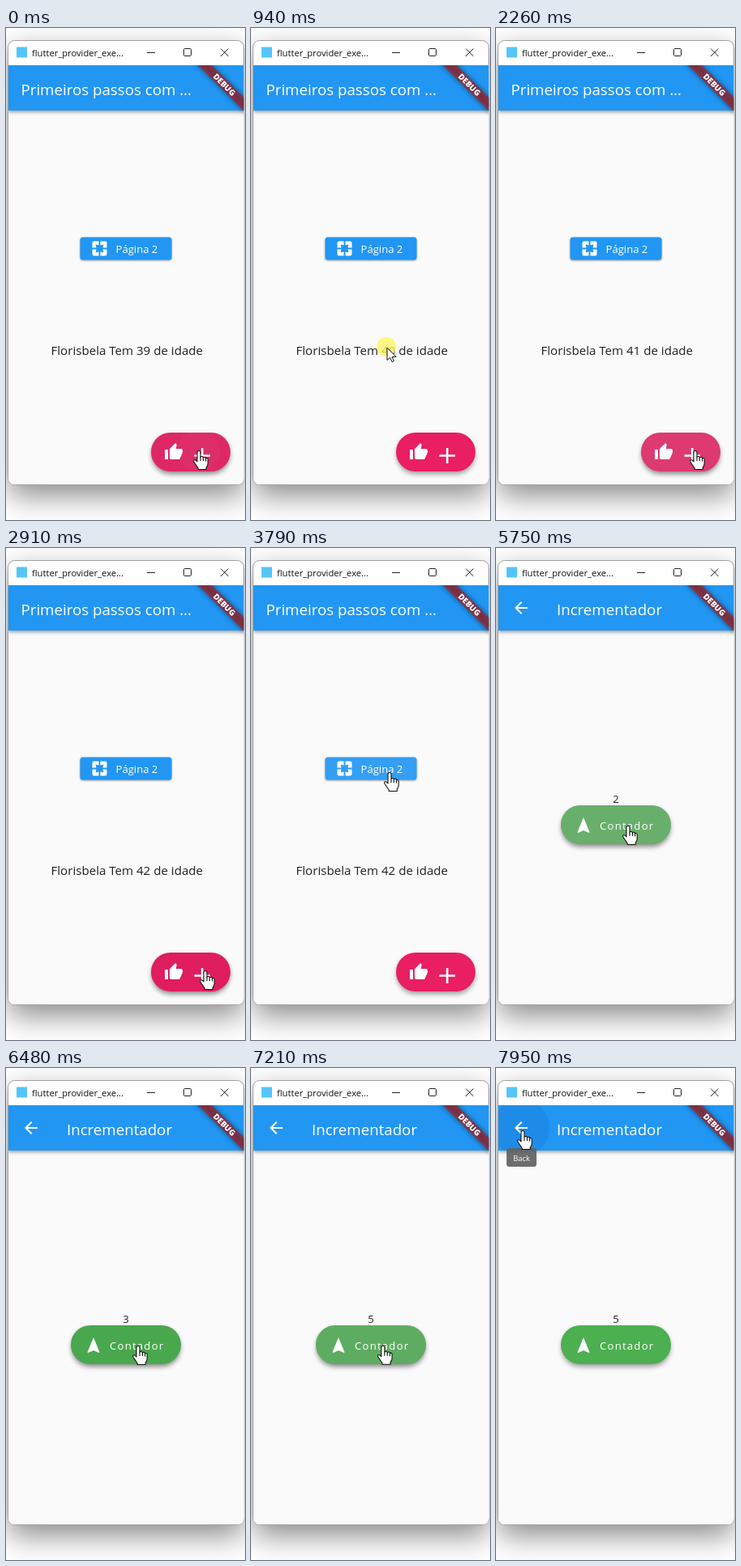
An HTML page that plays this animation: 295x608 px, repeating every 8000 ms.

```html
<!DOCTYPE html>
<html lang="pt">
<head>
<meta charset="utf-8">
<title>Provider demo</title>
<style>
html, body { margin: 0; width: 100%; height: 100%; overflow: hidden; background: #fff; }
svg { display: block; width: 295px; height: 608px; font-family: "Open Sans", "Noto Sans", sans-serif; }
.bar, .button { filter: drop-shadow(0 2px 2px rgba(0,0,0,.38)); }
.button { filter: drop-shadow(0 1.5px 1.2px rgba(0,0,0,.4)); }
.title { font-size: 18.7px; }
.label { font-size: 13.1px; }
.white { fill: #fff; }
.ink { fill: #202020; }
</style>
</head>
<body>
<svg viewBox="0 0 295 608">
  <defs>
    <filter id="blur" x="-40%" y="-20%" width="180%" height="140%"><feGaussianBlur stdDeviation="18"/></filter>
    <filter id="soft" x="-40%" y="-100%" width="180%" height="300%"><feGaussianBlur stdDeviation="3"/></filter>
    <clipPath id="client"><path d="M3 46H293.500V556.500a7.500 7.500 0 0 1 -7.500 7.500H10.500a7.500 7.500 0 0 1 -7.500 -7.500Z"/></clipPath>
    <clipPath id="fabClip"><rect x="179" y="500" width="98" height="48" rx="24"/></clipPath>
    <clipPath id="pillClip"><rect id="pillMask" height="48" rx="24"/></clipPath>
    <clipPath id="barClip"><rect x="3" y="46" width="290" height="56"/></clipPath>
  </defs>

  <rect width="295" height="608" fill="#fff"/>
  <rect x="3" y="29" width="290" height="549" rx="8" opacity=".46" filter="url(#blur)"/>
  <rect x="2.500" y="15.500" width="291" height="549" rx="8" fill="#fff" stroke="#a2a2a2"/>
  <rect x="13" y="23.500" width="13" height="13" fill="#54c5f8"/>
  <text x="32" y="34.500" font-size="11.2" fill="#111">flutter_provider_exe...</text>
  <path d="M174 30.500H184M265 25.500L274.500 35M274.500 25.500L265 35" stroke="#222" fill="none"/>
  <rect x="219.500" y="25.500" width="9" height="9" rx="1.200" fill="none" stroke="#222"/>

  <g clip-path="url(#client)">
    <rect x="3" y="46" width="291" height="519" fill="#fafafa"/>
    <g id="home">
      <rect x="3" y="46" width="291" height="519" fill="#fafafa"/>
      <rect class="bar" x="3" y="46" width="291" height="56" fill="#2196f3"/>
      <text class="title white" x="18.500" y="83">Primeiros passos com …</text>
      <rect class="button" id="next" x="91.500" y="258.500" width="113" height="28" rx="3.500"/>
      <path class="white" transform="translate(103.500 260.500)" d="M3 5v6h5L7 7l4 1V3H5c-1.100 0-2 .9-2 2zm5 8H3v6c0 1.100.9 2 2 2h6v-5l-4 1 1-4zm9 4l-4-1v5h6c1.100 0 2-.9 2-2v-6h-5l1 4zm2-14h-6v5l4-1-1 4h5V5c0-1.100-.9-2-2-2z"/>
      <text class="label white" x="135.500" y="278">Página 2</text>
      <text class="ink" id="age" x="243" y="404" font-size="15.100" text-anchor="end"></text>
      <g id="fab">
        <rect id="fabShadow" x="180" y="504" width="96" height="47" rx="23" filter="url(#soft)"/>
        <g clip-path="url(#fabClip)">
          <rect x="179" y="500" width="98" height="48" fill="#e91e63"/>
          <rect id="fabHover" x="179" y="500" width="98" height="48"/>
          <rect id="fabFlash" x="179" y="500" width="98" height="48" fill="#bcbcbc"/>
          <circle id="fabRipple" fill="#c8c8c8"/>
        </g>
        <path class="white" transform="translate(195 512)" d="M1 21h4V9H1v12zm22-11c0-1.100-.9-2-2-2h-6.310l.95-4.570.03-.32c0-.41-.17-.79-.44-1.060L14.170 1 7.590 7.590C7.220 7.950 7 8.450 7 9v10c0 1.100.9 2 2 2h9c.83 0 1.540-.5 1.840-1.220l3.020-7.050c.09-.23.14-.47.14-.73v-2z"/>
        <path d="M232.500 528.500H252M242.200 519V538" stroke="#fff" stroke-width="2.600"/>
      </g>
    </g>

    <g id="counterPage">
      <rect x="3" y="46" width="291" height="519" fill="#fafafa"/>
      <rect class="bar" x="3" y="46" width="291" height="56" fill="#2196f3"/>
      <circle id="backHover" cx="31" cy="74" r="35" fill="#1565c0" clip-path="url(#barClip)"/>
      <path class="white" transform="translate(19 62)" d="M20 11H7.830l5.590-5.590L12 4l-8 8 8 8 1.410-1.410L7.830 13H20v-2z"/>
      <text class="title white" x="75" y="83">Incrementador</text>
      <text class="label ink" id="count" x="148" y="315" text-anchor="middle"></text>
    </g>
    <g id="pill">
      <rect id="pillShadow" height="47" rx="23" filter="url(#soft)"/>
      <g clip-path="url(#pillClip)">
        <rect id="pillBody" height="48" fill="#4caf50"/>
        <rect id="pillHover" height="48"/>
        <rect id="pillFlash" height="48" fill="#bcbcbc"/>
        <circle id="pillRipple" fill="#c8c8c8"/>
        <g id="pillContent" class="white">
          <path transform="translate(16 13)" d="M12 2L4.500 20.290l.71.71L12 18l6.790 3 .71-.71z"/>
          <text class="label" x="48" y="30" letter-spacing="1.250">Contador</text>
        </g>
      </g>
    </g>

    <g transform="translate(293.500 46) rotate(45)">
      <rect x="-44" y="28" width="88" height="12" opacity=".5" filter="url(#soft)"/>
      <rect x="-44" y="28" width="88" height="12" fill="#b71c1c" opacity=".627"/>
      <text class="white" y="37.500" font-size="9.900" font-weight="800" text-anchor="middle">DEBUG</text>
    </g>
    <g id="tooltip">
      <rect x="13" y="99" width="37" height="23" rx="3.500" fill="#616161" opacity=".92"/>
      <text class="white" x="31.500" y="114.500" font-size="9.400" text-anchor="middle">Back</text>
    </g>
  </g>

  <g id="cursor">
    <g id="arrow">
      <circle cx="-1" cy="-1" r="12" fill="#fff55f" opacity=".78"/>
      <path d="M0 0V15.500L3.600 12.200 6 17.600 8.400 16.500 6 11.300H11Z" fill="#fff" stroke="#111"/>
    </g>
    <g id="hand" fill="#fff" stroke="#111" stroke-width="1.100" stroke-linejoin="round">
      <path d="M-2 13V1.500a2 2 0 0 1 4 0V7.500a1.800 1.800 0 0 1 3.400 .5a1.800 1.800 0 0 1 3.200 .7a1.700 1.700 0 0 1 2.600 1.300V15q0 3 -2 5v2.500H-.8V21L-6 13.200q-1 -2.400 1 -2.400q1.300 0 3 2.200z"/>
      <path d="M2 7.500V12M5.400 8V12M8.600 9V12.500" fill="none"/>
    </g>
  </g>
</svg>
<script>
const LOOP = 8000;
const el = {};
document.querySelectorAll("[id]").forEach(node => el[node.id] = node);

const fabClicks = [75, 2120, 2550];
const pillClicks = [5170, 5680, 6190, 6630, 7080];
const route = { start: 4070, end: 4390 };

// time, x, y of the pointer tip
const path = [
  [0, 238, 523], [230, 238, 523], [680, 168, 395], [1000, 168, 395],
  [1700, 246, 523], [3420, 246, 523], [3750, 171, 278], [4110, 171, 278],
  [4500, 163, 334], [5020, 163, 334], [5160, 163, 344], [7200, 163, 344],
  [7800, 33, 78], [LOOP, 33, 78]
];

const clamp = v => Math.max(0, Math.min(1, v));
const lerp = (a, b, p) => a + (b - a) * p;
const smooth = p => p * p * (3 - 2 * p);
const ramp = (t, from, to) => clamp((t - from) / (to - from));
const set = (node, attrs) => { for (const k in attrs) node.setAttribute(k, attrs[k]); };
const show = (node, on) => set(node, { visibility: on ? "visible" : "hidden" });
const inside = (p, x, y, w, h) => p.x >= x && p.x <= x + w && p.y >= y && p.y <= y + h;
const passed = (clicks, t) => clicks.filter(c => t >= c).length;

function pointerAt(t) {
  const i = Math.max(1, path.findIndex(k => t < k[0]));
  const [a, b] = [path[i - 1], path[i]];
  const p = smooth(ramp(t, a[0], b[0]));
  return { x: lerp(a[1], b[1], p), y: lerp(a[2], b[2], p) };
}

function press(name, clicks, t, pointer) {
  let strength = 0, radius = 0;
  for (const c of clicks) {
    const s = t < c ? ramp(t, c - 100, c) : 1 - ramp(t, c, c + 250);
    if (s > strength) {
      strength = s;
      radius = lerp(15, 110, ramp(t, c - 100, c + 120));
    }
  }
  set(el[name + "Flash"], { opacity: strength * .25 });
  set(el[name + "Ripple"], { cx: pointer.x, cy: pointer.y, r: radius, opacity: strength * .15 });
}

function hover(name, on) {
  set(el[name + "Hover"], { opacity: on ? .04 : 0 });
  set(el[name + "Shadow"], { opacity: on ? .48 : .4 });
}

function render(t) {
  const pointer = pointerAt(t);
  const p = ramp(t, route.start, route.end);
  const ease = 1 - Math.pow(1 - p, 3);
  const onHome = p === 0;

  const overFab = onHome && inside(pointer, 179, 500, 98, 48);
  const overNext = onHome && inside(pointer, 91, 258, 113, 29);
  const overPill = p === 1 && inside(pointer, 80, 318, 136, 48);
  const overBack = p === 1 && inside(pointer, 3, 46, 56, 56);

  el.age.textContent = `Florisbela Tem ${39 + passed(fabClicks, t)} de idade`;
  el.count.textContent = passed(pillClicks, t);
  set(el.next, { fill: overNext ? "#339ef4" : "#2196f3" });
  hover("fab", overFab);
  hover("pill", overPill);
  press("fab", fabClicks, t, pointer);
  press("pill", pillClicks, t, pointer);

  // Route zoom, with the floating button flying between pages
  show(el.fab, onHome);
  show(el.pill, !onHome);
  show(el.counterPage, !onHome);
  const scale = lerp(.85, 1, ease);
  set(el.counterPage, {
    opacity: clamp(p * 4),
    transform: `translate(148 305) scale(${scale}) translate(-148 -305)`
  });
  const x = lerp(179, 80, ease), y = lerp(500, 318, smooth(p)), width = lerp(98, 136, ease);
  for (const part of ["Mask", "Body", "Hover", "Flash"]) set(el["pill" + part], { x, y, width });
  set(el.pillShadow, { x: x + 1, y: y + 4, width: width - 2 });
  set(el.pillContent, { transform: `translate(${x} ${y})` });

  const tip = ramp(t, 7800, 7900);
  set(el.tooltip, { opacity: tip });
  set(el.backHover, { opacity: overBack ? .22 : 0 });

  const hand = overFab || overNext || overPill || overBack || (!onHome && p < 1);
  set(el.cursor, { transform: `translate(${pointer.x} ${pointer.y})` });
  show(el.hand, hand);
  show(el.arrow, !hand);
}

const begin = performance.now();
function tick() {
  render((performance.now() - begin) % LOOP);
  requestAnimationFrame(tick);
}
tick();
</script>
</body>
</html>
```
